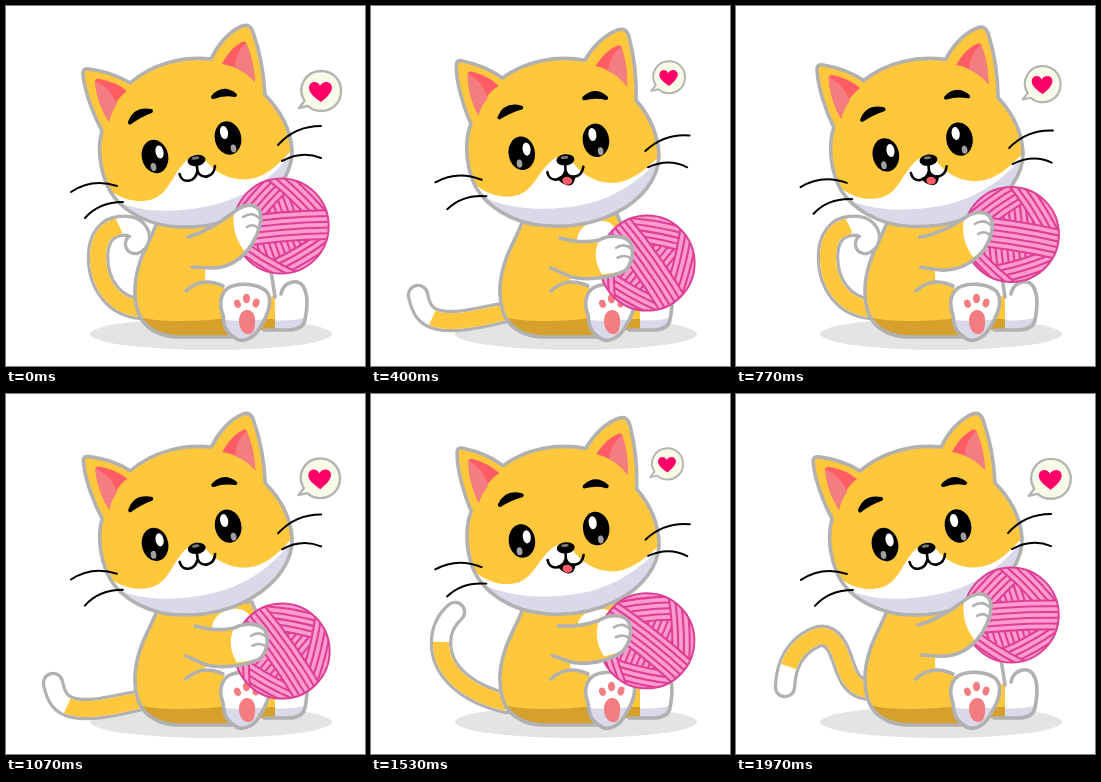
These frames come from a looping animation (359x360 px, 2010 ms). An HTML page:

```html
<!DOCTYPE html>
<html lang="en">
<head>
<meta charset="utf-8">
<title>Kitten with yarn</title>
<style>
html, body { margin: 0; width: 100%; height: 100%; overflow: hidden; background: #fff; }
svg { display: block; width: 359px; height: 360px; }
.line { fill: none; stroke: #b1b1b1; stroke-width: 3.6; stroke-linecap: round; stroke-linejoin: round; }
.ink { fill: none; stroke: #000; stroke-linecap: round; stroke-linejoin: round; }
.fur { fill: #ffc73c; }
.dark { fill: #d5a02c; }
.white { fill: #fff; }
.shade { fill: #d9d9ea; }
.pink { fill: #f47d82; }
.red { fill: #ff5c66; }
</style>
</head>
<body>
<svg viewBox="0 0 359 360">
  <defs>
    <path id="headShape" d="M96 125C89 112 78 86 77 67Q77 62 83 63C98 65 113 70 124 77C146 58 176 50 205 53C211 40 222 26 236 20Q244 17 247 26C254 46 258 68 259 89C273 103 284 122 286 143C287 166 272 188 247 203C227 215 203 221 179 221C147 222 114 206 102 181C94 164 91 142 96 125Z"/>
    <path id="bodyShape" d="M154 208C148 228 139 240 134 256C128 274 127 290 132 306C138 322 151 330 172 331H240L262 300C263 262 258 235 246 208Z"/>
    <path id="footShape" d="M228 331C235 338 247 333 253 323C262 309 267 295 261 286C252 277 232 276 222 282C214 288 213 299 217 309C218 316 217 324 228 331Z"/>
    <path id="legShape" d="M269 262H280L276 283C280 276 290 273 296 279C303 288 301 303 299 314Q297 323 284 324H269Z"/>
    <clipPath id="headClip"><use href="#headShape"/></clipPath>
    <clipPath id="bodyClip"><use href="#bodyShape"/></clipPath>
    <clipPath id="footClip"><use href="#footShape"/></clipPath>
    <clipPath id="legClip"><use href="#legShape"/></clipPath>
    <clipPath id="ballClip"><circle r="47.5"/></clipPath>
  </defs>

  <ellipse cx="205" cy="328" rx="121" ry="16" fill="#e4e4e4"/>

  <g fill="none" stroke-linejoin="round">
    <path class="tail" stroke="#b1b1b1" stroke-width="22.5" stroke-linecap="round"/>
    <path class="tail" stroke="#fff" stroke-width="16" stroke-linecap="round"/>
    <path class="tail" id="tailFur" pathLength="100" stroke="#ffc73c" stroke-width="16"/>
  </g>

  <use href="#bodyShape" class="fur"/>
  <g clip-path="url(#bodyClip)">
    <path class="white" d="M206 238C204 219 226 210 239 217C249 224 254 240 258 256V290H203C196 270 199 252 206 238Z"/>
    <path class="fur" d="M178 287Q196 270 218 280L226 335H170Z"/>
    <path class="dark" d="M125 309C150 317 190 316 222 312V335H125Z"/>
  </g>
  <use href="#bodyShape" class="line"/>
  <g id="curl" fill="none" stroke-linecap="round">
    <path d="M114 220C133 217 139 234 129 238" stroke="#b1b1b1" stroke-width="22.5"/>
    <path d="M114 220C133 217 139 234 129 238" stroke="#fff" stroke-width="16"/>
    <path d="M102 225L113 219.500" stroke="#ffc73c" stroke-width="16" stroke-linecap="butt"/>
  </g>

  <path class="white" d="M240 262H270V300H240Z"/>
  <path class="fur" d="M255 298L269 288V324H250Z"/>
  <path class="dark" d="M253 313H269V324H250Z"/>
  <use href="#legShape" class="white"/>
  <path class="shade" clip-path="url(#legClip)" d="M265 314Q285 316 303 311V326H265Z"/>
  <path class="line" d="M265 265L269 291M275 288C277 276 291 272 297 280C303 290 301 303 299 314Q297 323 284 324H258"/>
  <path class="line" d="M180 285Q196 270 217 280"/>
  <use href="#footShape" class="white"/>
  <path class="shade" clip-path="url(#footClip)" d="M210 313Q238 317 268 312V340H210Z"/>
  <use href="#footShape" class="line"/>
  <g class="pink">
    <ellipse cx="231.500" cy="298" rx="3.300" ry="4.300" transform="rotate(-20 231 298)"/>
    <ellipse cx="240.500" cy="292.500" rx="3.600" ry="4.800"/>
    <ellipse cx="250" cy="297" rx="3.300" ry="4.500" transform="rotate(20 250 297)"/>
    <path d="M241 304C247 304 250 310 249 317C249 325 246 329 241 328C236 327 233 321 233 315C233 309 236 304 241 304Z"/>
  </g>

  <g id="head">
    <use href="#headShape" class="fur"/>
    <path class="red" d="M89 75Q90 72 94 73Q110 76 121 85C112 91 106 102 103 116C95 104 90 88 89 75Z"/>
    <path class="pink" d="M89 75C99 79 107 88 111 98C107 104 104 110 103 116C95 104 90 88 89 75Z"/>
    <path class="red" d="M216 58C221 48 228 40 236 36Q240 34 241 39C246 51 248 62 249 76C240 66 229 60 216 58Z"/>
    <path class="pink" d="M240 37C246 51 248 62 249 76Q240 66 229 62C229 52 233 43 240 37Z"/>
    <g clip-path="url(#headClip)">
      <path class="white" d="M90 170C102 188 126 200 147 193C164 187 167 166 181 154Q190 147 199 154C211 169 230 177 249 172C266 167 277 153 290 140V230H90Z"/>
      <path class="shade" d="M100 189C125 207 165 208 203 200C240 192 266 173 290 142V230H96Z"/>
    </g>
    <use href="#headShape" class="line"/>
    <path class="ink" style="fill:#000" stroke-width="4" d="M124 116.500Q129 102 145 105Q134 109 124 116.500ZM207 91Q217 80 229 89Q218 87 207 91Z"/>
    <g id="eyes"></g>
    <path class="ink" stroke-width="2" d="M65 186Q86 172 111 180M79 212Q93 196 117 196M272 139Q289 120 315 120M276 155Q296 144 315 152"/>
    <g id="muzzle">
      <path id="mouth" stroke="#000" stroke-width="1.500"/>
      <ellipse id="tongue" class="red"/>
      <path class="ink" stroke-width="2.600" d="M173.500 168C176 178 189 177 191.500 165C195 174 208 172 209 160M190.500 157L191.500 165"/>
      <ellipse cx="190.500" cy="154.500" rx="9" ry="5.600" transform="rotate(-10 190 154)"/>
      <ellipse cx="189.500" cy="152" rx="3.800" ry="1.500" fill="#777" transform="rotate(-10 190 152)"/>
    </g>
  </g>

  <g id="ball">
    <circle r="47.500" fill="#de3f94"/>
    <g id="yarn" clip-path="url(#ballClip)" fill="none"></g>
    <circle r="47.500" fill="none" stroke="#de3f94" stroke-width="2"/>
  </g>

  <path id="arm" class="fur"/>
  <path id="paw" class="white"/>
  <path id="armLine" class="line"/>
  <path id="fingers" class="line" style="stroke-width:2.600"/>

  <g id="bubble">
    <path d="M0 0L5.500 -7C-3 -21 7 -37 22 -37C34 -37 42 -28 42 -17C42 -5 33 3 22 3C16 3 12 1 9 -2Z" fill="#f9fbe9" stroke="#b4b4b4" stroke-width="2.400" stroke-linejoin="round"/>
    <path d="M22 -6C15 -11 10 -15 10 -20C10 -27 19 -28 21 -22C24 -28 33 -27 33 -20C32 -14 27 -10 22 -6Z" fill="#ff0068"/>
  </g>
</svg>
<script>
const LOOP = 2010, FRAMES = 60, HEAD_CYCLE = 30, BALL_CYCLE = 20;
const $ = id => document.getElementById(id);
const set = (id, attrs) => { for (const k in attrs) $(id).setAttribute(k, attrs[k]); };
const wave = (i, n) => (1 - Math.cos(i / n * 2 * Math.PI)) / 2;

// Blend two paths that share the same commands.
function blend(a, b, k) {
  const to = b.match(/-?[\d.]+/g);
  let n = 0;
  return a.replace(/-?[\d.]+/g, v => (+v + (to[n++] - v) * k).toFixed(2));
}

// Centre line from the body to the tip, and the length of the coloured part.
const tails = [
  ["M136 303C107 301 92 277 92 251C92 231 102 221 114 220", 96],
  ["M136 309C99 301 70 279 70 249C70 235 76 225 84 218", 74],
  ["M136 309C103 310 72 298 56 280C45 268 37 257 34 245", 74],
  ["M136 306C115 310 88 318 68 314C54 311 50 303 47 289", 73],
  ["M136 296C113 296 111 277 105 262C98 242 88 239 78 244C61 252 50 268 49 293", 86]
];

const arms = {
  top: ["M182 231C200 226 215 216 228 206", "M190 232C204 237 216 239 228 237"],
  hand: ["C236 199 247 196 253 204C258 213 252 228 246 238", "C238 232 254 232 260 240C264 250 262 262 254 268"],
  under: ["C236 254 222 262 205 262L186 261", "C238 274 215 276 200 272L179 262"],
  wrist: ["M228 206", "M228 237"],
  cuff: ["L239 246Q225 228 228 206", "L230 271Q220 254 228 237"],
  fingers: ["M237 211Q246 205 253 212M241 221Q247 217 252 222", "M246 245Q254 240 261 246M247 255Q255 251 261 256"]
};

const spot = (x, y, rx, ry, fill) =>
  `<ellipse transform="translate(${x} ${y}) rotate(-12)" rx="${rx}" ry="${ry}" fill="${fill}"/>`;
const eye = (x, y, lightX, lightY, glowX) => spot(x, y, 13.2, 16.8, "#000") +
  spot(x + lightX, y + lightY, 4, 6.6, "#fff") + spot(x + glowX, y + 10.5, 2.8, 4, "#a0a0a0");
$("eyes").innerHTML = eye(149, 150.5, 4.5, -4.5, -1.5) + eye(222, 132, -4, -5.5, 5.5);

// A bundle of parallel strands across the ball.
function bundle(angle, offset, count, bend) {
  const gap = 5.8;
  const strand = (y, w, color) =>
    `<path d="M-62 ${y}Q0 ${y + bend} 62 ${y}" stroke="${color}" stroke-width="${w}"/>`;
  let out = strand(offset, count * gap + 2, "#de3f94");
  for (let k = 0; k < count; k++)
    out += strand(offset + (k - (count - 1) / 2) * gap, 3.7, "#ff9ccf");
  return `<g transform="rotate(${angle})">${out}</g>`;
}
$("yarn").innerHTML = bundle(70, 0, 18, 0) + bundle(-50, -30, 6, -14) +
  bundle(46, -34, 5, -12) + bundle(-30, 34, 5, 14) +
  bundle(32, 38, 4, 14) + bundle(-5, 4, 5, -6);

function draw(i) {
  const p = wave(i, HEAD_CYCLE), b = wave(i, BALL_CYCLE);
  const pose = Math.floor(i % BALL_CYCLE / 4);

  const [path, fur] = tails[pose];
  document.querySelectorAll(".tail").forEach(e => e.setAttribute("d", path));
  set("tailFur", { "stroke-dasharray": `${fur} 200` });
  set("curl", { visibility: pose === 0 ? "visible" : "hidden" });

  set("head", { transform: `rotate(${4.8 * p} 193 172)` });
  set("muzzle", { transform: `translate(${2.7 * p} ${-0.6 * p})` });
  const open = Math.min(1, Math.max(0, p * 2.4 - 0.12));
  set("mouth", {
    d: `M185 173Q190 171 191.500 166Q195 171 201 170Q201 ${171 + 8 * open} 195 ${172 + 7 * open}Q188 ${172 + 6 * open} 185 173Z`,
    visibility: open > 0 ? "visible" : "hidden"
  });
  set("tongue", { cx: 194, cy: 171 + 4 * open, rx: 5 * open, ry: 4 * open });

  set("ball", { transform: `translate(${275.2 + b} ${220 + 41 * b})` });
  set("yarn", { transform: `rotate(${66 * b})` });

  const part = name => blend(...arms[name], b);
  const arm = part("top") + part("hand") + part("under");
  set("arm", { d: arm + "Z" });
  set("armLine", { d: arm });
  set("paw", { d: part("wrist") + part("hand") + part("cuff") + "Z" });
  set("fingers", { d: part("fingers") });

  set("bubble", { transform: `translate(${293 - 14 * p} ${102 - 19 * p}) scale(${1 - 0.22 * p})` });
}

const start = performance.now();
function tick() {
  const t = (performance.now() - start) % LOOP;
  draw(Math.min(FRAMES - 1, Math.floor((Math.floor(t / 10) + 0.5) * 0.3)));
  requestAnimationFrame(tick);
}
tick();
</script>
</body>
</html>
```
